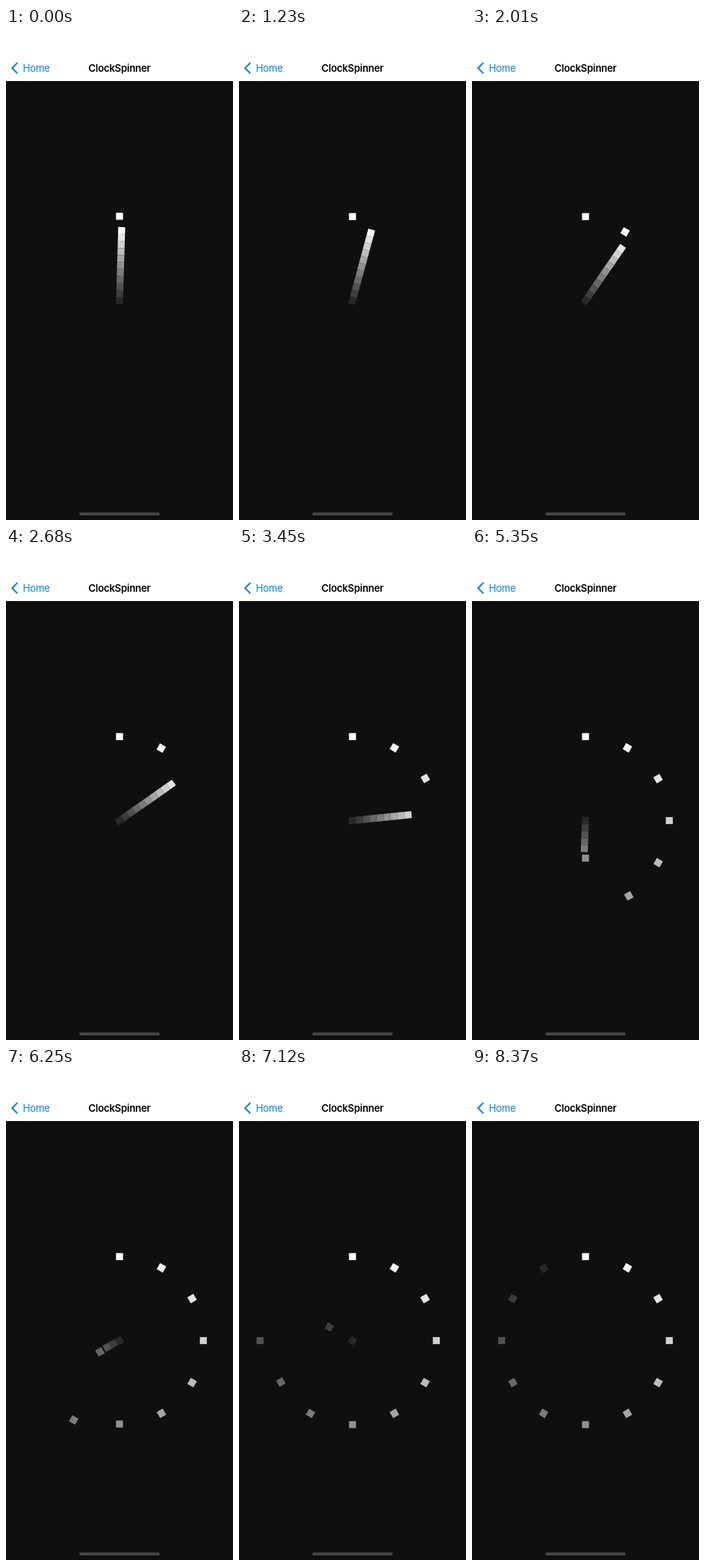
Recreate the animation shown at these times as an HTML page. Size 296 by 640 pixels, loop 8430 ms.

```html
<!DOCTYPE html>
<html lang="en">
<head>
<meta charset="utf-8">
<title>ClockSpinner</title>
<style>
  html, body { margin: 0; width: 100%; height: 100%; overflow: hidden; background: #0f0f0f; }
  svg { display: block; width: 296px; height: 640px; }
  text { font: 12.9px Inter, Roboto, sans-serif; letter-spacing: -.25px; }
  .title { font-weight: 600; text-anchor: middle; }
</style>
</head>
<body>
<svg viewBox="0 0 296 640">
  <rect width="296" height="640" fill="#0f0f0f"/>
  <rect width="296" height="69" fill="#fff"/>
  <path d="M14.4 45.8 8 52.2l6.4 6.4" fill="none" stroke="#0a80ea" stroke-width="2" stroke-linecap="round" stroke-linejoin="round"/>
  <text x="22" y="56.8" fill="#0a80ea">Home</text>
  <text class="title" x="148" y="56.8">ClockSpinner</text>
  <rect x="95.5" y="630.2" width="105" height="3.8" rx="1.9" fill="#484848"/>
  <g id="clock" transform="translate(148 354.6)"></g>
</svg>
<script>
const COUNT = 12, SIZE = 9.108, LOOP = 8430;
const LEAD = 0.582;        // seconds of the turn already elapsed when the loop begins
const ACCELERATION = 5.18; // degrees per second squared: angle = ACCELERATION * s * s

// Runs of evenly spaced redraws: first time, last time, number of redraws.
const RUNS = [
  [110, 900, 8], [1020, 1790, 8], [1890, 2680, 8], [2790, 3560, 8], [3680, 4450, 8],
  [4550, 5350, 8], [5460, 6250, 8], [6350, 7120, 8], [7240, 8070, 9], [8170, 8370, 3]
];
const redraws = [0, ...RUNS.flatMap(([first, last, n]) =>
  Array.from({ length: n }, (_, k) =>
    Math.round((first + (last - first) * k / (n - 1)) / 10) * 10))];

// Underdamped spring from 0 to 1, damping ratio one half.
function spring(s) {
  const w = 9.2, damped = w * Math.sqrt(0.75) * s;
  return 1 - Math.exp(-w * s / 2) * (Math.cos(damped) + Math.sin(damped) / Math.sqrt(3));
}

const clock = document.getElementById('clock');
const blocks = Array.from({ length: COUNT }, (_, i) => {
  const rect = document.createElementNS('http://www.w3.org/2000/svg', 'rect');
  const gray = Math.min(255, 271 - 21 * i);
  rect.setAttribute('x', -SIZE / 2);
  rect.setAttribute('y', -SIZE / 2);
  rect.setAttribute('width', SIZE);
  rect.setAttribute('height', SIZE);
  rect.setAttribute('fill', `rgb(${gray},${gray},${gray})`);
  return clock.appendChild(rect);
});

function draw(ms) {
  const s = ms / 1000 + LEAD;
  const hand = ACCELERATION * s * s;
  blocks.forEach((block, i) => {
    const stop = i * 360 / COUNT;
    const released = Math.max(0, s - Math.sqrt(stop / ACCELERATION));
    const slot = COUNT - 1 - i;
    const radius = SIZE * (slot + (COUNT - slot) * spring(released));
    block.setAttribute('transform', `rotate(${Math.min(hand, stop)}) translate(0 ${-radius})`);
  });
}

const start = performance.now();
function tick(now) {
  const ms = Math.max(0, now - start) % LOOP;
  draw(redraws.findLast(time => time <= ms));
  requestAnimationFrame(tick);
}
draw(0);
requestAnimationFrame(tick);
</script>
</body>
</html>
```
